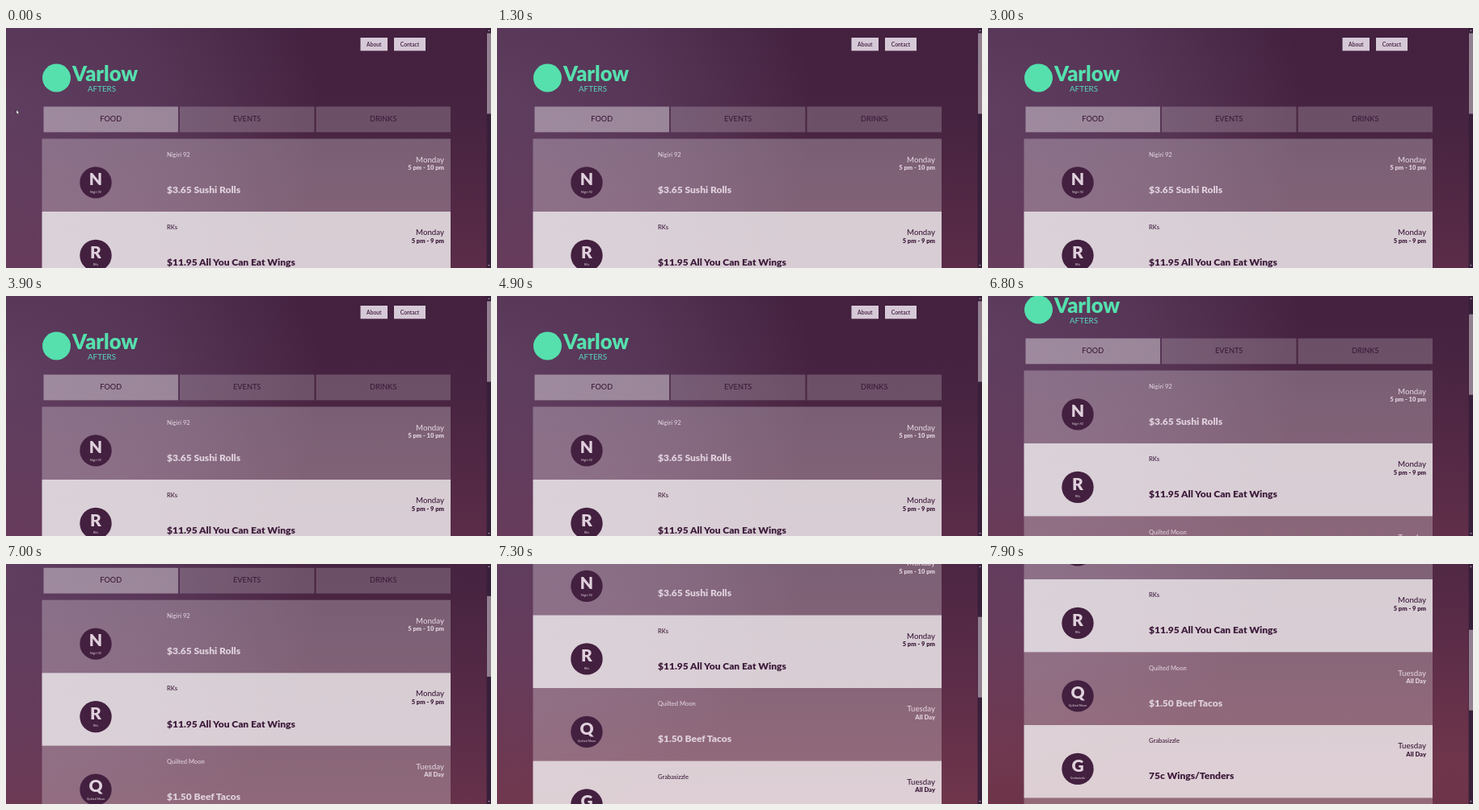
Animation, 600 px wide and 298 px high, one loop 8000 ms. Source, as an HTML page:

```html
<!DOCTYPE html>
<html lang="en">
<head>
<meta charset="utf-8">
<title>Weekly specials</title>
<style>
  html, body { margin: 0; width: 100%; height: 100%; overflow: hidden; background: #54304f; }
  svg { display: block; width: 600px; height: 298px; font-family: Lato, "Open Sans", sans-serif; }
</style>
</head>
<body>
<svg id="stage" viewBox="0 0 600 298">
  <defs>
    <linearGradient id="sky" x2="0" y2="1">
      <stop offset="0" stop-color="#43213f"/>
      <stop offset=".2" stop-color="#472441"/>
      <stop offset=".5" stop-color="#5b2c48"/>
      <stop offset=".75" stop-color="#6e354b"/>
      <stop offset="1" stop-color="#6b3347"/>
    </linearGradient>
    <radialGradient id="glow" gradientUnits="userSpaceOnUse" cx="0" cy="100" r="390">
      <stop offset="0" stop-color="#9678a5" stop-opacity=".31"/>
      <stop offset=".5" stop-color="#9678a5" stop-opacity=".21"/>
      <stop offset="1" stop-color="#9678a5" stop-opacity="0"/>
    </radialGradient>
  </defs>
  <g id="page"></g>
  <g id="bar"></g>
  <path id="cursor" d="M0 0v4.6l1.1-1 .8 1.7.8-.4-.8-1.6h1.4z" fill="#fff" stroke="#222" stroke-width=".3"/>
</svg>
<script>
const LOOP = 8000, STEP = 100;
const DARK = '#3d1b3b', PALE = '#dfd0dc', GREEN = '#55e0ad';
const ROW_TOP = 137.5, ROW_H = 90.5;
const page = document.getElementById('page');
const bar = document.getElementById('bar');
const cursor = document.getElementById('cursor');

function add(parent, tag, attrs, label) {
  const el = document.createElementNS('http://www.w3.org/2000/svg', tag);
  for (const key in attrs) el.setAttribute(key, attrs[key]);
  if (label) el.textContent = label;
  parent.append(el);
  return el;
}

function rect(parent, x, y, width, height, fill, alpha = 1) {
  return add(parent, 'rect', { x, y, width, height, fill, 'fill-opacity': alpha });
}

function text(parent, label, x, y, size, fill, weight = 400, anchor = 'start') {
  add(parent, 'text', {
    x, y, fill, 'font-size': size, 'font-weight': weight, 'text-anchor': anchor
  }, label);
}

function drawHeader() {
  add(page, 'circle', { cx: 62.5, cy: 62, r: 17.5, fill: GREEN });
  text(page, 'Varlow', 82, 66, 25.5, GREEN, 900);
  text(page, 'AFTERS', 118.5, 78.5, 9.8, '#58d5c4', 400, 'middle');
  for (const [label, x, w] of [['About', 438.5, 33.5], ['Contact', 480, 39]]) {
    rect(page, x, 12, w, 16.3, '#d6c9d7');
    text(page, label, x + w / 2, 22.5, 6.7, DARK, 600, 'middle');
  }
  ['FOOD', 'EVENTS', 'DRINKS'].forEach((label, i) => {
    const x = 46.5 + i * 168.5;
    rect(page, x, 97.6, 166.5, 31.8, '#fff', i ? .2 : .4);
    text(page, label, x + 83.2, 115.6, 9.2, DARK, 500, 'middle');
  });
}

function drawRow([name, deal, day, hours], i) {
  const ink = i % 2 ? DARK : PALE;
  const g = add(page, 'g', { transform: `translate(0 ${ROW_TOP + i * ROW_H})` });
  rect(g, 44.5, 0, 505.5, ROW_H, '#fff', i % 2 ? .765 : .265);
  if (!name) return;
  add(g, 'circle', { cx: 111, cy: 54.4, r: 19.7, fill: '#43203f' });
  text(g, name[0], 111, 57.8, 21, PALE, 900, 'middle');
  text(g, name, 111, 67, 3.7, PALE, 400, 'middle');
  text(g, name, 199, 22.2, 7.6, ink, 500);
  text(g, deal, 199, 67.4, 12, ink, 900);
  text(g, day, 542, 29.1, 9.7, ink, 500, 'end');
  text(g, hours, 542, 38.8, 7.6, ink, 900, 'end');
}

rect(page, 0, 0, 600, 600, 'url(#sky)');
rect(page, 0, 0, 600, 600, 'url(#glow)');
drawHeader();
[
  ['Nigiri 92', '$3.65 Sushi Rolls', 'Monday', '5 pm - 10 pm'],
  ['RKs', '$11.95 All You Can Eat Wings', 'Monday', '5 pm - 9 pm'],
  ['Quilted Moon', '$1.50 Beef Tacos', 'Tuesday', 'All Day'],
  ['Grabasizzle', '75c Wings/Tenders', 'Tuesday', 'All Day'],
  []
].forEach(drawRow);

rect(bar, 594.6, 0, 5.4, 298, '#38203a');
const thumb = rect(bar, 595, 6.5, 5, 100, '#928090');
add(bar, 'path', { d: 'M596 4l1.4-1.8L598.8 4zM596 294l1.4 1.8 1.4-1.8z', fill: '#a797a6' });

// Time in ms, value
const scrollKeys = [[6600, 0], [6800, 45], [7300, 164.5], [7900, 209]];
const cursorKeys = [[0, 13], [600, -6]];

function valueAt(keys, t) {
  if (t <= keys[0][0]) return keys[0][1];
  for (let i = 1; i < keys.length; i++) {
    const [t0, v0] = keys[i - 1], [t1, v1] = keys[i];
    if (t <= t1) return v0 + (v1 - v0) * (t - t0) / (t1 - t0);
  }
  return keys[keys.length - 1][1];
}

function draw() {
  const t = Math.floor(performance.now() % LOOP / STEP) * STEP;
  const y = valueAt(scrollKeys, t);
  page.setAttribute('transform', `translate(0 ${-y})`);
  thumb.setAttribute('y', 6.5 + y * .36);
  cursor.setAttribute('transform', `translate(${valueAt(cursorKeys, t)} 102)`);
  requestAnimationFrame(draw);
}
draw();
</script>
</body>
</html>
```
